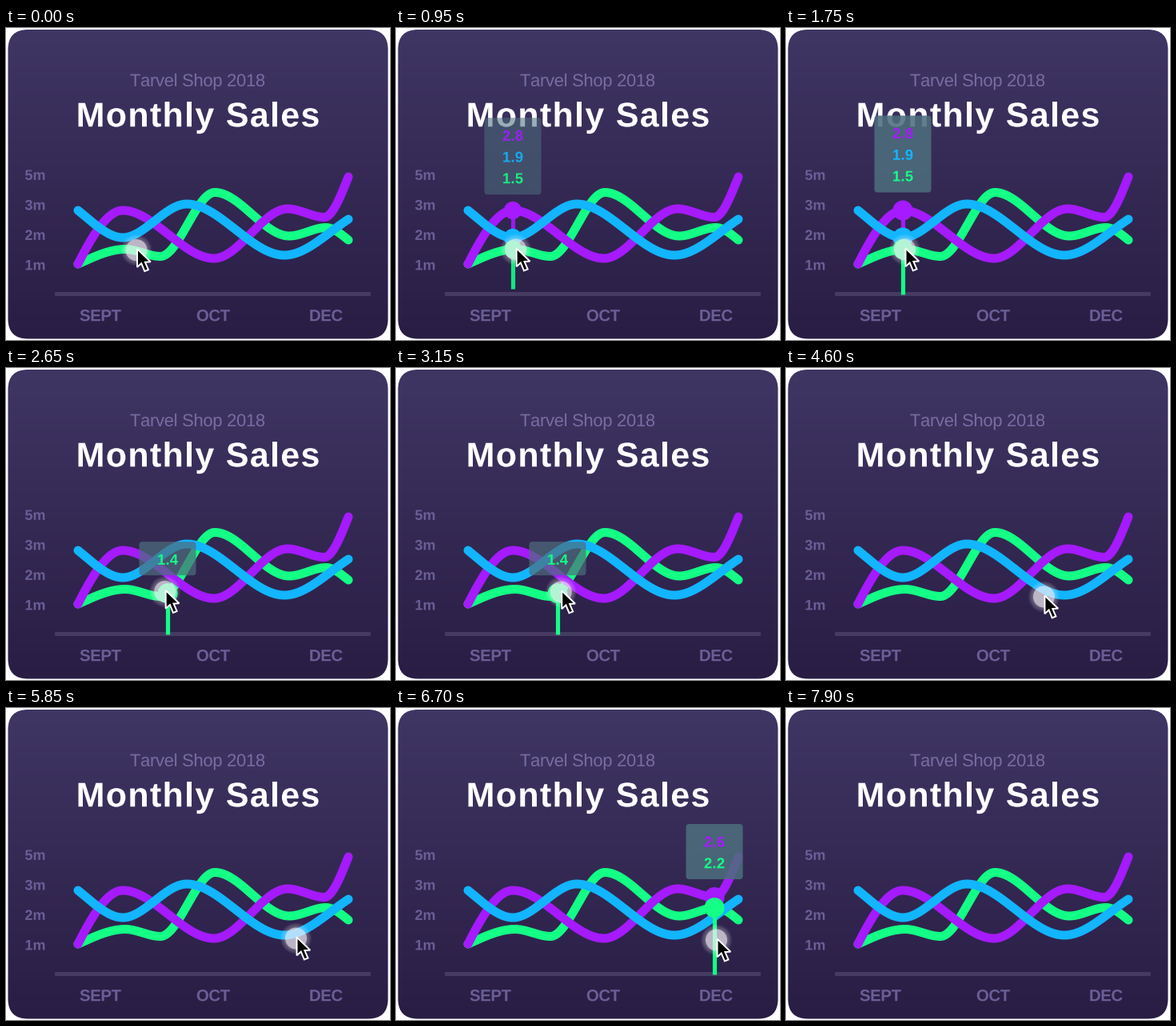
Animation, 480 px wide and 390 px high, one loop 7950 ms. Source, as a matplotlib script:

```python
import numpy as np
import matplotlib.pyplot as plt
from matplotlib.animation import FuncAnimation
from matplotlib.patches import Circle, FancyBboxPatch, PathPatch, Polygon
from matplotlib.path import Path
from matplotlib.textpath import TextPath

W, H, DPI = 480, 390, 100
STEP, FRAMES = 50, 159
PX = 72 / DPI

GREEN, PURPLE, BLUE = "#14ff85", "#a51aff", "#12b5ff"
MUTED, SUBTLE, BAR = "#6a5e96", "#786ca2", "#463c61"
TIP_FILL = "#4d6d7d"

BASE_Y, UNIT = 296, 37.5      # height of the 1m mark, pixels per million
AXIS_Y = 332.5
FADE, NEAR = 350, 13

# Colour, turning points between the two ends, slope at either end
CURVES = [
    (GREEN, [(90, 295), (149, 276.5), (193, 285.5), (261, 205.5), (354, 260), (400, 249.5), (428, 265)], -.45, .8),
    (PURPLE, [(90, 295), (146, 228), (260, 288), (352, 226), (398, 236.5), (428, 186)], -2, -2.5),
    (BLUE, [(90, 228), (146, 262), (226, 220), (348, 284), (428, 239)], .8, -.65),
]
# Hovered position, show time, hide time
STOPS = [(146, 850, 2000), (202, 2500, 3050), (258.5, 3280, 4000),
         (347, 4620, 5480), (398, 6200, 6850)]
ARROW = .93 * np.array([(0, 0), (0, 24.5), (5.6, 19.4), (10, 30), (15, 28), (10.6, 17.8), (18, 17.4)])


def smooth(u):
    u = np.clip(u, 0, 1)
    return u * u * (3 - 2 * u)


def ease_out(u):
    return 1 - (1 - np.clip(u, 0, 1)) ** 3


def curve_y(x, points, slope_in, slope_out):
    """Cubic through the points, level at every inner one."""
    px, py = np.transpose(points)
    i = np.clip(np.searchsorted(px, x) - 1, 0, len(px) - 2)
    span = px[i + 1] - px[i]
    u = (x - px[i]) / span
    y = py[i] + (py[i + 1] - py[i]) * smooth(u)
    y = y + np.where(i == 0, slope_in, 0) * span * u * (1 - u) ** 2
    return y - np.where(i == len(px) - 2, slope_out, 0) * span * u * u * (1 - u)


def rows_at(x):
    """Height and colour of each curve that turns near x, from the top down."""
    return sorted((float(curve_y(x, pts, a, b)), color) for color, pts, a, b in CURVES
                  if any(abs(px - x) < NEAR for px, _ in pts))


def glyph_path(text, size, weight, gap):
    """Outline of a tracked string, centred on the origin at mid cap height."""
    prop = {"family": "Liberation Sans", "weight": weight}

    def right(s):
        return TextPath((0, 0), s, size=size, prop=prop).get_extents().x1

    verts, codes, x = [], [], 0
    for ch in text:
        if ch != " ":
            glyph = TextPath((x, 0), ch, size=size, prop=prop)
            verts.append(glyph.vertices)
            codes.append(glyph.codes)
        x += right(ch + "|") - right("|") + gap
    verts = (np.concatenate(verts) - [(x - gap) / 2, size * .355]) * [1, -1]
    return Path(verts, np.concatenate(codes))


def label(text, x, y, size, color, weight="bold", gap=0.0, **kw):
    path = glyph_path(text, size, weight, gap)
    return PathPatch(Path(path.vertices + [x, y], path.codes), fc=color, lw=0, **kw)


def round_box(x, y, w, h, r, **kw):
    return FancyBboxPatch((x, y), w, h, boxstyle=f"round,pad=0,rounding_size={r}", **kw)


fig = plt.figure(figsize=(W / DPI, H / DPI), dpi=DPI, facecolor="white")
ax = fig.add_axes([0, 0, 1, 1])
ax.axis("off")

# Card
card = round_box(2.5, 2, 475, 386.5, 25, fc="none", lw=0)
ax.add_patch(card)
top, bottom = np.array([64, 54, 100]) / 255, np.array([41, 29, 68]) / 255
shade = np.linspace(0, 1, H)[:, None, None]
backdrop = ax.imshow(top + (bottom - top) * shade, extent=(0, W, H, 0), aspect="auto", zorder=0)
backdrop.set_clip_path(card)

# Headings and axes
ax.add_patch(label("Tarvel Shop 2018", 239.5, 65, 22, SUBTLE, "normal", -.3))
ax.add_patch(label("Monthly Sales", 240, 108, 43, "white", gap=1.3))
for i, text in enumerate(["1m", "2m", "3m", "5m"]):
    ax.add_patch(label(text, 36.5, BASE_Y - UNIT * i, 18, MUTED))
for i, text in enumerate(["SEPT", "OCT", "DEC"]):
    ax.add_patch(label(text, 118 + 141 * i, 359, 20.5, MUTED, gap=-.5))
ax.add_patch(round_box(61, 330, 395, 5, 1.5, fc=BAR, lw=0))

for color, pts, a, b in CURVES:
    xs = np.linspace(pts[0][0], pts[-1][0], 300)
    ax.plot(xs, curve_y(xs, pts, a, b), color=color, lw=11 * PX,
            solid_capstyle="round", solid_joinstyle="round", zorder=2)
ax.set_xlim(0, W)
ax.set_ylim(H, 0)

live = []


def put(artist, z):
    artist.set_zorder(z)
    live.append(ax.add_patch(artist))


def draw_tip(x, p):
    rows = rows_at(x)
    lead = min(1, p * 1.4)
    ends = [y for y, _ in rows[1:]] + [AXIS_Y]
    for (y, color), end in zip(rows, ends):
        stem = Path([(x, y), (x, y + (end - y) * lead)])
        put(PathPatch(stem, ec=color, fc="none", lw=5.2 * PX, capstyle="butt", alpha=lead), 3)
        put(Circle((x, y), 12.5 * lead, fc=color, lw=0), 4)
    h = 15 + 27 * len(rows)
    y = rows[0][0] - 22.5 - h + 25 * (1 - lead)
    put(round_box(x - 35.5, y, 71, h, 4, fc=TIP_FILL, lw=0, alpha=.88 * p), 5)
    for i, (value_y, color) in enumerate(rows):
        value = f"{1 + (BASE_Y - value_y) / UNIT:.1f}"
        put(label(value, x, y + 22 + 26.7 * i, 18.5, color, gap=.2, alpha=lead), 6)


def pointer_at(t):
    x, leave = 163, 0
    for stop, show, hide in STOPS:
        x += (stop + 2.5 - x) * smooth((t - leave) / (show + 300 - leave))
        leave = hide + 50
    return x, 277 + .052 * (x - 151)


def draw_pointer(x, y, alpha):
    for r in np.arange(14.5, 20):
        put(Circle((x, y), r, fc="white", lw=0, alpha=.055 * alpha), 7)
    put(Circle((x, y), 13.5, fc="#f4eef6", lw=0, alpha=.6 * alpha), 7)
    put(Polygon(ARROW + [x + 1, y - 1.5], fc="black", ec="white", lw=2 * PX,
                joinstyle="miter", alpha=alpha), 8)


def draw(frame):
    t = frame * STEP
    while live:
        live.pop().remove()
    for x, show, hide in STOPS:
        p = ease_out((t - show) / FADE) * (1 - smooth((t - hide) / FADE))
        if p > 0:
            draw_tip(x, p)
    alpha = 1 - smooth((t - 7600) / 300)
    if alpha > 0:
        draw_pointer(*pointer_at(t), alpha)
    return live


anim = FuncAnimation(fig, draw, frames=FRAMES, interval=STEP, init_func=lambda: live,
                     repeat=True, repeat_delay=0, blit=False)
plt.show()
```
